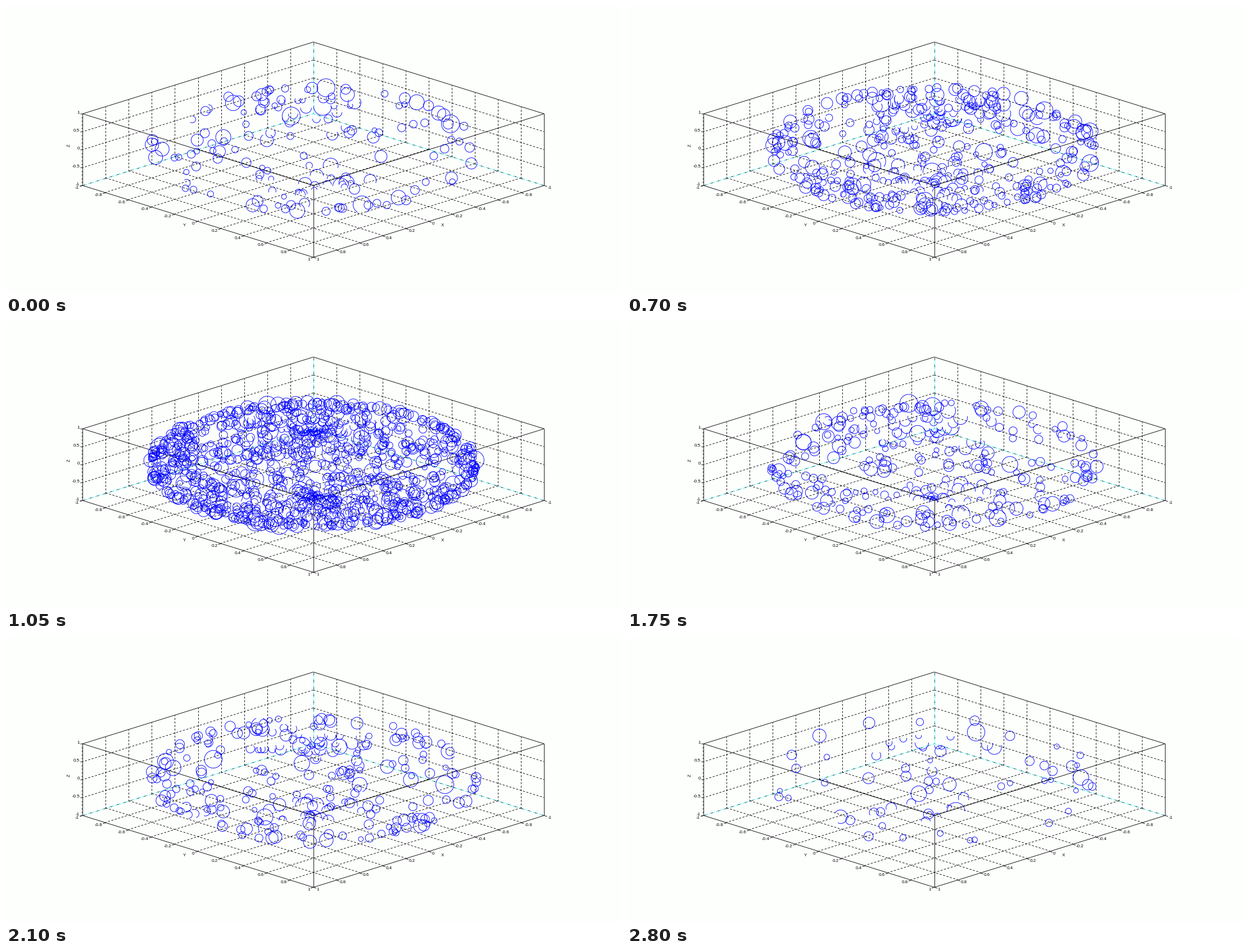
Animation, 1094 px wide and 512 px high, one loop 3.15 s. Source, as a matplotlib script:

```python
import numpy as np
import matplotlib.pyplot as plt
from matplotlib.animation import FuncAnimation
from matplotlib.collections import LineCollection

W, H, DPI = 1094, 512, 100
PX = 72 / DPI                      # one pixel in points
CX, CY, SX, SY = 546.75, 256.3, 205.25, 64
BG, BLUE, CYAN = "#fdfffd", "#0000ff", "#00e0e0"
DASH = (0, (4, 3))

# Number of circles at each step
COUNTS = [150, 300, 420, 1150, 300, 290, 260, 150, 72]

TURN = np.linspace(0, 2 * np.pi, 61)


def project(x, y, z):
    return CX + SX * (y - x), CY + SY * (x + y - z)


def cloud(step):
    """Screen-facing circles on the unit sphere, cut off outside the box."""
    rng = np.random.default_rng(40 + step)
    n = COUNTS[step]
    theta = rng.uniform(0, np.pi, (n, 1))
    phi = rng.uniform(0, 2 * np.pi, (n, 1))
    r = np.minimum(4 + rng.gamma(2.2, 1.9, (n, 1)), 16)

    x, y, z = np.sin(theta) * np.cos(phi), np.sin(theta) * np.sin(phi), np.cos(theta)
    cx, cy = project(x, y, z)
    right, up = r * np.cos(TURN), r * np.sin(TURN)
    outline = np.stack([cx + right, cy - up], axis=-1)

    # Box coordinates of each outline point
    px = x - (0.312 * up + right) / 410
    py = y - (0.312 * up - right) / 410
    pz = z + up / 70.6
    outside = np.maximum(np.maximum(abs(px), abs(py)), abs(pz)) > 1
    outline[outside] = np.nan
    return list(outline)


fig = plt.figure(figsize=(W / DPI, H / DPI), dpi=DPI, facecolor=BG)
ax = fig.add_axes([0, 0, 1, 1])
ax.set_xlim(0, W)
ax.set_ylim(H, 0)
ax.axis("off")


def lines(segs, color="black", dash="solid", z=1.0, width=0.9):
    col = LineCollection(segs, colors=color, linestyles=[dash],
                         linewidths=width * PX, zorder=z)
    ax.add_collection(col, autolim=False)
    return col


def edge(a, b, dy=0):
    (x0, y0), (x1, y1) = project(*a), project(*b)
    return [(x0, y0 + dy), (x1, y1 + dy)]


def label(x, y, text, ha="center", **kw):
    kw.setdefault("va", "baseline")
    ax.text(x, y, text, ha=ha, fontsize=8 * PX, family="Liberation Sans",
            zorder=4, **kw)


# Hidden edges
back = [edge((-1, -1, -1), p) for p in [(1, -1, -1), (-1, 1, -1), (-1, -1, 1)]]
lines(back, CYAN, DASH)
lines(back, "black", (3, (3, 11)), 1.1)

# Dashed grid on the floor and both back walls
grid = []
for t in np.arange(-4, 5) / 5:
    grid += [edge((t, -1, -1), (t, 1, -1), -0.8),
             edge((-1, t, -1), (1, t, -1), -0.8),
             edge((t, -1, -1), (t, -1, 1)),
             edge((-1, t, -1), (-1, t, 1))]
for t in (-0.5, 0, 0.5):
    grid += [edge((-1, -1, t), (1, -1, t)), edge((-1, -1, t), (-1, 1, t))]
lines(grid, "black", DASH, 1.2)

# Solid box edges
box = [edge((x, y, -1), (x, y, 1)) for x, y in [(1, 1), (1, -1), (-1, 1)]]
for p in [(1, 1, 1), (-1, -1, 1), (1, 1, -1)]:
    box += [edge(p, (1, -1, p[2])), edge(p, (-1, 1, p[2]))]

# Ticks and labels
for t in np.arange(-5, 6) / 5:
    for side, (x, y) in ((-1, project(1, t, -1)), (1, project(t, 1, -1))):
        box.append([(x, y), (x + 5 * side, y + 1.6)])
        label(x + 6 * side, y + 5.7, f"{t:g}", "right" if side < 0 else "left")
for t in np.arange(-10, 11) / 10:
    x, y = project(1, -1, t)
    major = round(t * 10) % 5 == 0
    box.append([(x, y), (x - (4 if major else 2), y)])
    if major:
        label(x - 5, y, f"{t:g}", "right")
lines(box, z=2)
label(317, 393, "Y")
label(777, 393, "X")
label(112, 249, "Z", rotation=90, va="center")

dots = lines([], BLUE, z=3)
clouds = [cloud(i) for i in range(len(COUNTS))]


def draw(step):
    dots.set_segments(clouds[step])
    return [dots]


anim = FuncAnimation(fig, draw, frames=len(COUNTS), interval=350,
                     repeat=True, repeat_delay=0, blit=False)
plt.show()
```
